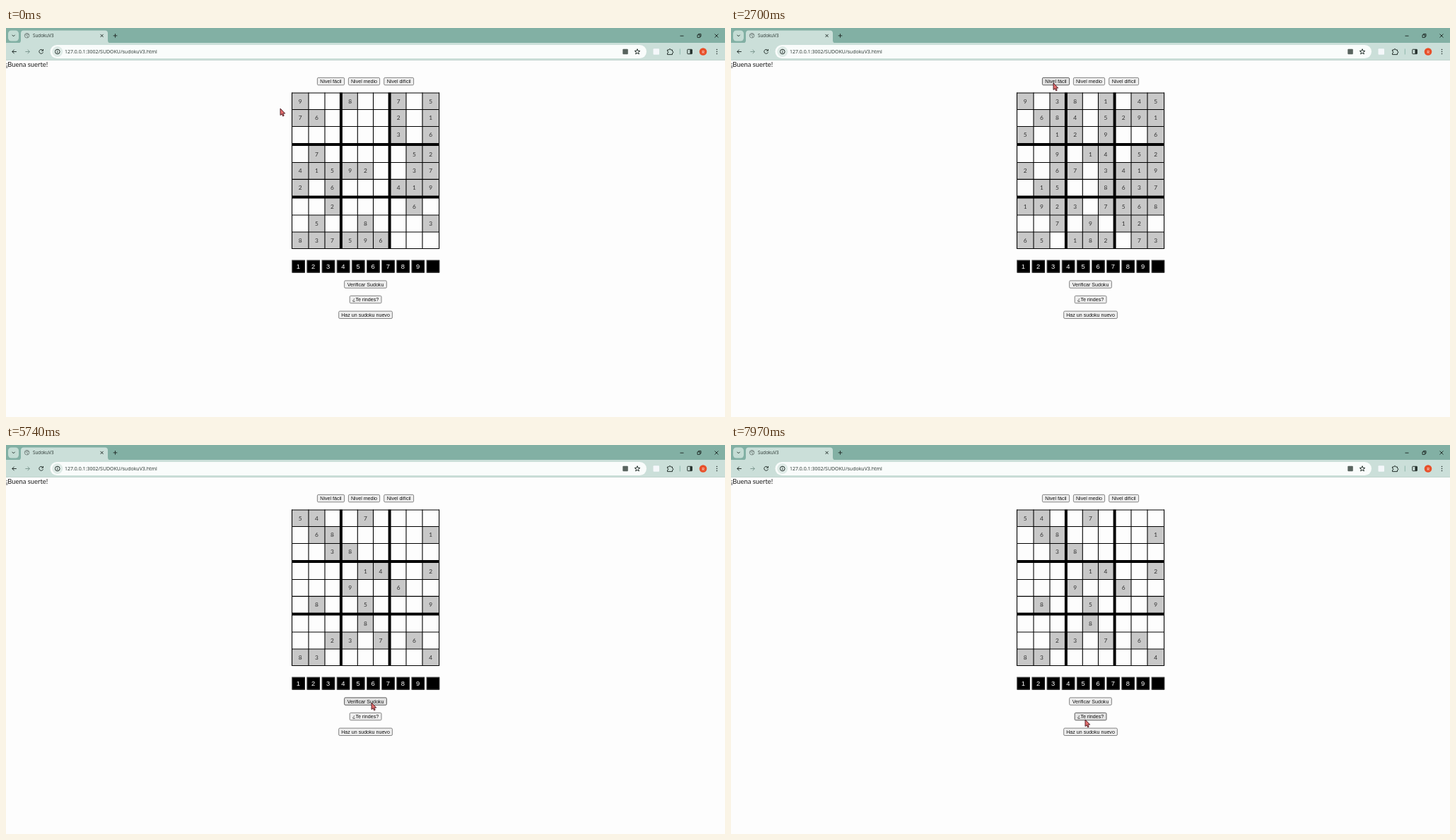
Recreate the animation shown at these times as an HTML page. Size 1017 px wide and 551 px high, loop 8 s.

```html
<!DOCTYPE html>
<html lang="es">
<head>
<meta charset="utf-8">
<title>SudokuV3</title>
<style>
  html, body { margin: 0; width: 100%; height: 100%; overflow: hidden; background: #fdfdfd; }
  svg { display: block; width: 100%; height: 100%; }
  .ui { font-family: "Open Sans", "Noto Sans", sans-serif; }
  .page { font-family: Lato, sans-serif; }
  .btn, .key { font-family: "Liberation Sans", Arial, sans-serif; }
  .mid { text-anchor: middle; }
  .line { fill: none; stroke: #26322e; stroke-width: 1; }
</style>
</head>
<body>
<svg id="stage" viewBox="0 0 1017 551" preserveAspectRatio="none">
  <rect width="1017" height="551" fill="#fdfdfd"/>

  <g id="browser" class="ui">
    <rect width="1017" height="22" fill="#82b0a4"/>
    <rect y="21" width="1017" height="24.5" fill="#cbdfd9"/>
    <path d="M0 45.5H1017" stroke="#b9cec7" stroke-width=".8"/>
    <rect x="3" y="3.5" width="15" height="15" rx="4.5" fill="#c4dcd4"/>
    <path class="line" d="M8.6 9.8l2 2 2-2"/>
    <path d="M17 21.5q4 0 4-4V7.500q0-4 4-4H140q4 0 4 4V17.500q0 4 4 4Z" fill="#cbdfd9"/>
    <g fill="none" stroke="#66736f" stroke-width=".8">
      <circle cx="29.600" cy="10.700" r="3.300"/>
      <path d="M26.600 10q2-1 3 .500t1 3M29 7.500q0 2 3.500 2"/>
    </g>
    <text x="38" y="13.300" font-size="6.3" fill="#26322e">SudokuV3</text>
    <path class="line" d="M133.600 8.900l4 4m0-4l-4 4M151.700 10.900h5.600m-2.800-2.800v5.600"/>
    <path class="line" stroke-width=".8" d="M953.500 11.200h5M1002.500 8.500l5 5m0-5l-5 5M978 9.800h3.600v3.600H978ZM979.400 9.600V8.400h3.600v3.600h-1.200"/>

    <path class="line" d="M14.800 33.500H8.800m2.800-2.800l-2.800 2.800 2.800 2.800"/>
    <path class="line" style="stroke:#7f9a92" d="M27.400 33.500h6m-2.800-2.800l2.800 2.800-2.800 2.800"/>
    <path class="line" d="M52.200 31.800a2.900 2.900 0 1 0 .3 2.500M52.500 30v2.300h-2.300"/>
    <rect x="62.500" y="24" width="843.500" height="19" rx="9.500" fill="#f9fcfb"/>
    <circle cx="72.800" cy="33.500" r="7.500" fill="#dfebe7"/>
    <circle class="line" cx="72.800" cy="33.500" r="3.300"/>
    <path class="line" d="M72.800 33v2.300M72.800 31.300v.9"/>
    <text x="83" y="36" font-size="7" fill="#26322e">127.0.0.1:3002/SUDOKU/sudokuV3.html</text>
    <rect x="872.300" y="29.800" width="7.500" height="7.500" rx="1" fill="#59645f"/>
    <path id="star" class="line" stroke-width=".9"/>
    <rect x="915.500" y="29.300" width="8.500" height="8.500" rx="1" fill="#f4f7fa"/>
    <path class="line" d="M935.500 31h2.200a1.300 1.300 0 0 1 2.600 0h2.200v2a1.300 1.300 0 0 1 0 2.600v2h-7v-2a1.300 1.300 0 0 0 0-2.600Z"/>
    <path d="M953.300 29.500v8" stroke="#8fb8ac"/>
    <rect class="line" x="963.800" y="30.300" width="6.600" height="6.400" rx=".6"/>
    <path d="M967.400 30.300h3v6.400h-3Z" fill="#26322e"/>
    <circle cx="986" cy="33.500" r="5.300" fill="#e8502a"/>
    <text class="mid" x="986" y="35.800" font-size="6" fill="#fff">R</text>
    <g fill="#26322e">
      <circle cx="1005.500" cy="30.500" r=".8"/><circle cx="1005.500" cy="33.500" r=".8"/><circle cx="1005.500" cy="36.500" r=".8"/>
    </g>
  </g>

  <text class="page" x="0" y="55" font-size="9.4" fill="#1c1c1c">¡Buena suerte!</text>
  <g id="cells" class="page mid" font-size="8.4"></g>
  <g id="grid" stroke="#000"></g>
  <g id="keys" class="key mid" font-size="9.4"></g>
  <g id="buttons" class="btn mid" font-size="7.1"></g>

  <g id="dialog" class="ui">
    <rect x="388.800" y="43.500" width="239.400" height="79.500" rx="5" fill="#000" opacity=".22"/>
    <rect x="389.500" y="43.500" width="238" height="78.300" rx="4.500" fill="#131a18"/>
    <text x="400" y="63.800" font-size="7.7" font-weight="600" fill="#e6ebe9">127.0.0.1:3002 dice</text>
    <text x="400" y="79.300" font-size="6.37" fill="#d5dbd9">El sudoku aún no está resuelto correctamente.</text>
    <rect x="573.700" y="90" width="44.300" height="21.800" rx="10.900" fill="none" stroke="#86d9c6"/>
    <rect x="575.500" y="91.800" width="40.700" height="18.200" rx="9.100" fill="#80d3c0"/>
    <text class="mid" x="595.800" y="103.200" font-size="6.5" fill="#10362e">Aceptar</text>
  </g>

  <path id="cursor" d="M0 0V9.600L2.200 7.700 3.600 10.900 5.200 10.200 3.800 7.100H6.700Z" fill="#e46e6e" stroke="#471820" stroke-width=".9" stroke-linejoin="round"/>
</svg>

<script>
const LOOP = 8000;
const NS = "http://www.w3.org/2000/svg";
const byId = id => document.getElementById(id);

function add(parent, tag, attrs, text) {
  const el = document.createElementNS(NS, tag);
  for (const key in attrs) el.setAttribute(key, attrs[key]);
  if (text !== undefined) el.textContent = text;
  return byId(parent).appendChild(el);
}

const xs = [404.5, 428, 451, 473.9, 497.3, 519.5, 542.6, 566, 589, 612.6];
const ys = [92, 115.5, 139.5, 164.9, 190.5, 214.4, 239.5, 265, 289, 312.5];

const boards = [
  { from: 0, rows: "900800705 760000201 000000306 070000052 415920037 206000419 002000060 050080003 837596000" },
  { from: 2600, rows: "903801045 068405291 501209006 009014052 206703419 015008637 192307568 007090120 650182073" },
  { from: 3450, rows: "060400091 020061740 041079306 000753010 405028630 379000800 830090000 090040068 000082000" },
  { from: 4300, rows: "540070000 068000001 003800000 000014002 000900600 080050009 000080000 002307060 830000004" }
];
const dialogSpan = [5800, 6800];

// Time, x, y of the pointer tip; it eases between neighbours.
const path = [
  [0, 388, 114], [1100, 102, 205], [1750, 102, 205],
  [2480, 456, 78], [2850, 456, 78],
  [3250, 507, 77], [3600, 507, 77],
  [4000, 564, 75], [4500, 564, 75],
  [5600, 517, 365], [5900, 517, 365],
  [6330, 592, 108], [6880, 592, 108],
  [7750, 501, 389], [LOOP, 501, 389]
];

// Thick block borders inset the neighbouring digits.
const inset = i => (i % 3 === 0 && i > 0 && i < 9 ? 2 : 0);
const center = (edges, i) =>
  (edges[i] + inset(i) + edges[i + 1] - inset(i + 1)) / 2;

const cells = [];
for (let r = 0; r < 9; r++) {
  for (let c = 0; c < 9; c++) {
    cells.push({
      box: add("cells", "rect", { x: xs[c], y: ys[r], width: xs[c + 1] - xs[c], height: ys[r + 1] - ys[r] }),
      label: add("cells", "text", { x: center(xs, c), y: center(ys, r) + 2.9, fill: "#303030" })
    });
  }
}

for (let i = 0; i < 10; i++) {
  const weight = inset(i) ? 4 : 1.1;
  add("grid", "path", { d: `M${xs[i]} 91.5V313`, "stroke-width": weight });
  add("grid", "path", { d: `M404 ${ys[i]}H613`, "stroke-width": weight });
}

for (let i = 0; i < 10; i++) {
  const x = 404.2 + i * 21.15;
  add("keys", "rect", { x: x + .5, y: 329, width: 17.7, height: 17.2, fill: "#000", stroke: "#555" });
  add("keys", "path", { d: `M${x + 1} 346.200h17.200v-17`, fill: "none", stroke: "#1c1c1c" });
  if (i < 9) add("keys", "text", { x: x + 9.2, y: 340.6, fill: "#fff" }, i + 1);
}

const buttons = [
  ["Nivel fácil", 440, 70, 39], ["Nivel medio", 484, 70, 45], ["Nivel difícil", 534.3, 70, 42.7],
  ["Verificar Sudoku", 478.2, 357.5, 60.6], ["¿Te rindes?", 485.8, 379, 45.6], ["Haz un sudoku nuevo", 470.3, 400.7, 76.5]
].map(([label, x, y, width]) => {
  const box = add("buttons", "rect", { x: x + .4, y: y + .4, width: width - .8, height: 10.4, rx: 1.5, "stroke-width": .9 });
  add("buttons", "text", { x: x + width / 2, y: y + 8, fill: "#111" }, label);
  return { box, x, y, width };
});

const starPoints = Array.from({ length: 10 }, (_, i) => {
  const r = i % 2 ? 1.7 : 4, a = i * Math.PI / 5;
  return `${893 + r * Math.sin(a)} ${33.7 - r * Math.cos(a)}`;
});
byId("star").setAttribute("d", `M${starPoints.join("L")}Z`);

let shown = null;
function showBoard(board) {
  if (board === shown) return;
  shown = board;
  [...board.rows.replaceAll(" ", "")].forEach((digit, i) => {
    const filled = digit !== "0";
    cells[i].box.setAttribute("fill", filled ? "#c8c8c8" : "#fdfdfd");
    cells[i].label.textContent = filled ? digit : "";
  });
}

function pointerAt(t) {
  const i = path.findIndex(p => p[0] > t);
  const [t0, x0, y0] = path[i - 1], [t1, x1, y1] = path[i];
  const p = (t - t0) / (t1 - t0), k = p * p * (3 - 2 * p);
  return [x0 + (x1 - x0) * k, y0 + (y1 - y0) * k];
}

function draw(t) {
  const [x, y] = pointerAt(t);
  const open = t >= dialogSpan[0] && t < dialogSpan[1];
  showBoard(boards.findLast(b => t >= b.from));
  byId("dialog").style.display = open ? "" : "none";
  byId("cursor").setAttribute("transform", `translate(${x} ${y})`);
  for (const b of buttons) {
    const over = !open && x >= b.x && x <= b.x + b.width && y >= b.y && y <= b.y + 11.2;
    b.box.setAttribute("fill", over ? "#e3e3e3" : "#efefef");
    b.box.setAttribute("stroke", over ? "#4a4a4a" : "#767676");
  }
}

const start = performance.now();
function tick() {
  draw((performance.now() - start) % LOOP);
  requestAnimationFrame(tick);
}
tick();
</script>
</body>
</html>
```
